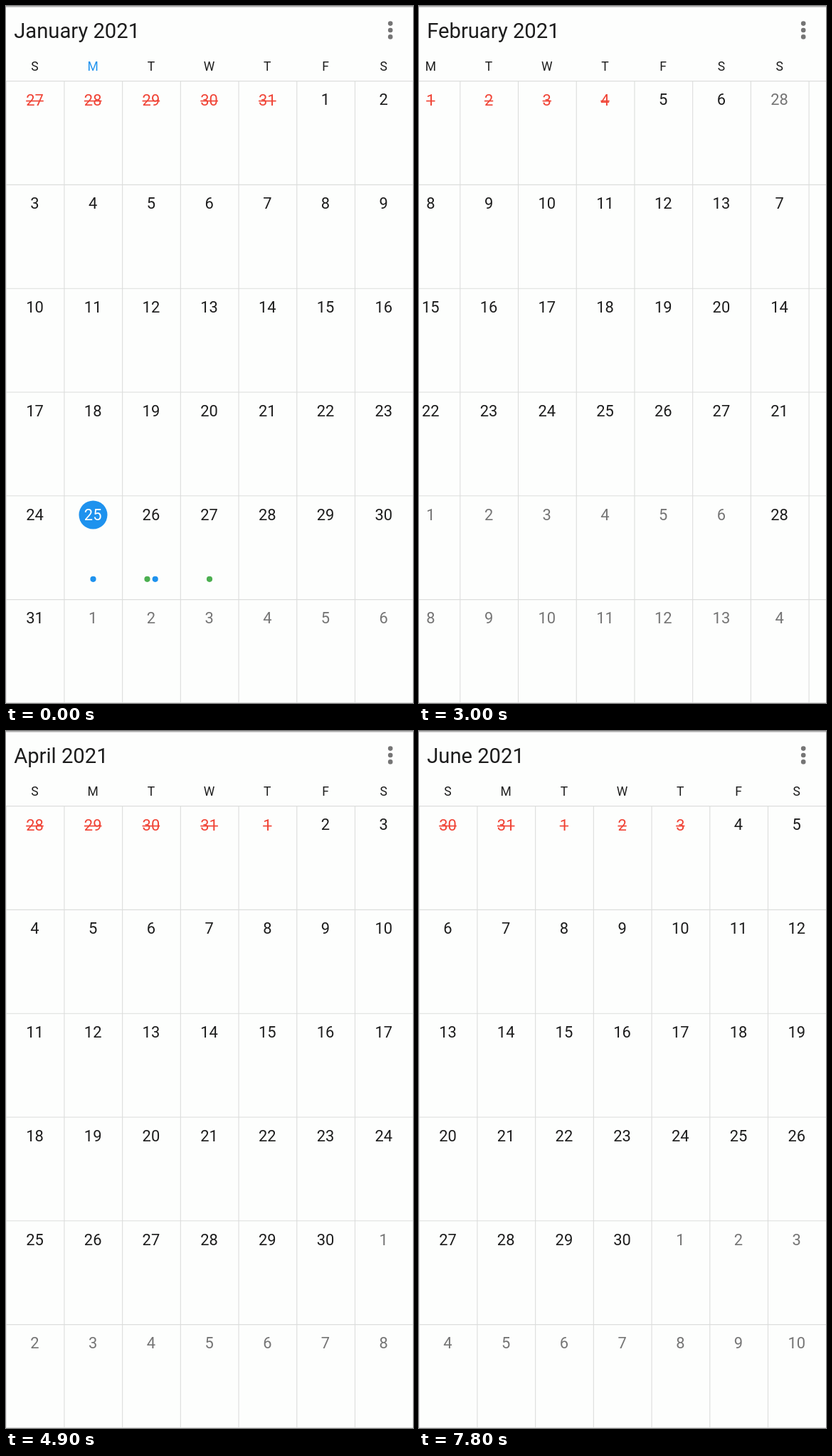
An HTML page for the animation above (8 s loop, 572 by 980 pixels).

```html
<!DOCTYPE html>
<html lang="en">
<head>
<meta charset="utf-8">
<title>Calendar</title>
<style>
  html, body { margin: 0; width: 100%; height: 100%; overflow: hidden; background: #fdfefd; }
  svg { display: block; width: 572px; height: 980px; font-family: Roboto, sans-serif; fill: #1d1d1d; }
  .title { font-size: 29.2px; }
  .week { font-size: 17.5px; text-anchor: middle; }
  .day { font-size: 21.9px; text-anchor: middle; }
  .grid { stroke: #dcdddc; stroke-width: 1.1; }
  .other { fill: #757575; }
  .today { fill: #1e92ee; }
  .green { fill: #4caf50; }
  .white { fill: #fff; }
  .past { fill: #f04436; }
  .menu { fill: #757575; }
</style>
</head>
<body>
<svg id="stage" viewBox="0 0 572 980"></svg>
<script>
const W = 572, COL = W / 7, ROW = 145.8, TOP = 105.6;
const LOOP = 8000, TICK = 100, YEAR = 2021, STRUCK = 5;
const MONTHS = ['January', 'February', 'March', 'April', 'May', 'June'];

// [time in ms, scroll position in pages], each held until the next
const SCROLL = [
  [0, 0],
  [1800, 0.2], [1900, 0.7], [2000, 0.93], [2100, 0.99], [2200, 1],
  [3000, 1.185], [3100, 1.7], [3200, 1.93], [3300, 1.985], [3400, 1.997], [3500, 2],
  [4400, 2.152], [4500, 2.58], [4600, 2.9], [4700, 2.98], [4800, 2.996], [4900, 3],
  [5700, 3.44], [5800, 3.989], [6000, 3.996], [6100, 4],
  [6800, 4.3], [6900, 4.9], [7000, 4.985], [7100, 5]
];

const stage = document.getElementById('stage');

function add(parent, tag, attrs, text) {
  const el = document.createElementNS('http://www.w3.org/2000/svg', tag);
  for (const key in attrs) el.setAttribute(key, attrs[key]);
  if (text !== undefined) el.textContent = text;
  parent.appendChild(el);
  return el;
}

const line = (parent, x1, y1, x2, y2) => add(parent, 'line', { x1, y1, x2, y2, class: 'grid' });
const dot = (parent, cx, cy, r, cls) => add(parent, 'circle', { cx, cy, r, class: cls });
const label = (parent, x, y, cls, text) => add(parent, 'text', { x, y, class: cls }, text);

function buildPage(parent, month) {
  const page = add(parent, 'g', { transform: `translate(${month * W} 0)` });
  const plain = add(page, 'g', {});
  const struck = add(page, 'g', {});
  const first = new Date(YEAR, month, 1).getDay();
  const center = col => (col + 0.5) * COL - 0.4;

  for (let c = 0; c < 7; c++) {
    line(page, c * COL + 0.2, TOP, c * COL + 0.2, 980);
    label(page, center(c), 91.2, month === 0 && c === 1 ? 'week today' : 'week', 'SMTWTFS'[c]);
  }
  for (let i = 0; i < 42; i++) {
    const date = new Date(YEAR, month, 1 - first + i);
    const day = date.getDate();
    const x = center(i % 7), y = TOP + Math.floor(i / 7) * ROW;
    const isToday = month === 0 && date.getMonth() === 0 && day === 25;
    if (isToday) dot(page, x + 0.3, y + 26.7, 20, 'today');
    const tone = isToday ? 'white' : date.getMonth() === month ? '' : 'other';
    label(i < STRUCK ? plain : isToday ? page : page, x, y + 33.8, 'day ' + tone, day);
    if (i < STRUCK) {
      const w = 12.3 * String(day).length;
      label(struck, x, y + 34.5, 'day past', day);
      add(struck, 'rect', { x: x - w / 2, y: y + 27.1, width: w, height: 1.7, class: 'past' });
    }
  }
  if (month === 0) {
    dot(page, 122.5, 805.8, 4.1, 'today');
    dot(page, 198.5, 805.8, 4.1, 'green');
    dot(page, 209.7, 805.8, 4.1, 'today');
    dot(page, 286, 805.8, 4.1, 'green');
  }
  return { plain, struck };
}

for (let r = 0; r < 7; r++) {
  const y = Math.min(TOP + r * ROW, 979.5);
  line(stage, 0, y, W, y);
}
const strip = add(stage, 'g', {});
const pages = MONTHS.map((_, m) => buildPage(strip, m));
add(stage, 'rect', { x: 0, y: 0, width: W, height: 1.6, fill: '#b2b2b2' });
const title = label(stage, 11.2, 44.6, 'title', '');
for (const y of [24.6, 34, 43.4]) dot(stage, 540.2, y, 3.3, 'menu');

function draw(ms) {
  const t = Math.floor((ms % LOOP) / TICK) * TICK;
  let pos = 0;
  for (const [at, value] of SCROLL) if (t >= at) pos = value;
  const current = Math.round(pos);
  strip.setAttribute('transform', `translate(${-pos * W} 0)`);
  title.textContent = `${MONTHS[current]} ${YEAR}`;
  // only pages already selected have their first days crossed out
  pages.forEach((p, m) => {
    p.struck.style.display = m <= current ? '' : 'none';
    p.plain.style.display = m <= current ? 'none' : '';
  });
}

const start = performance.now();
function frame() {
  draw(performance.now() - start);
  requestAnimationFrame(frame);
}
draw(0);
requestAnimationFrame(frame);
</script>
</body>
</html>
```
